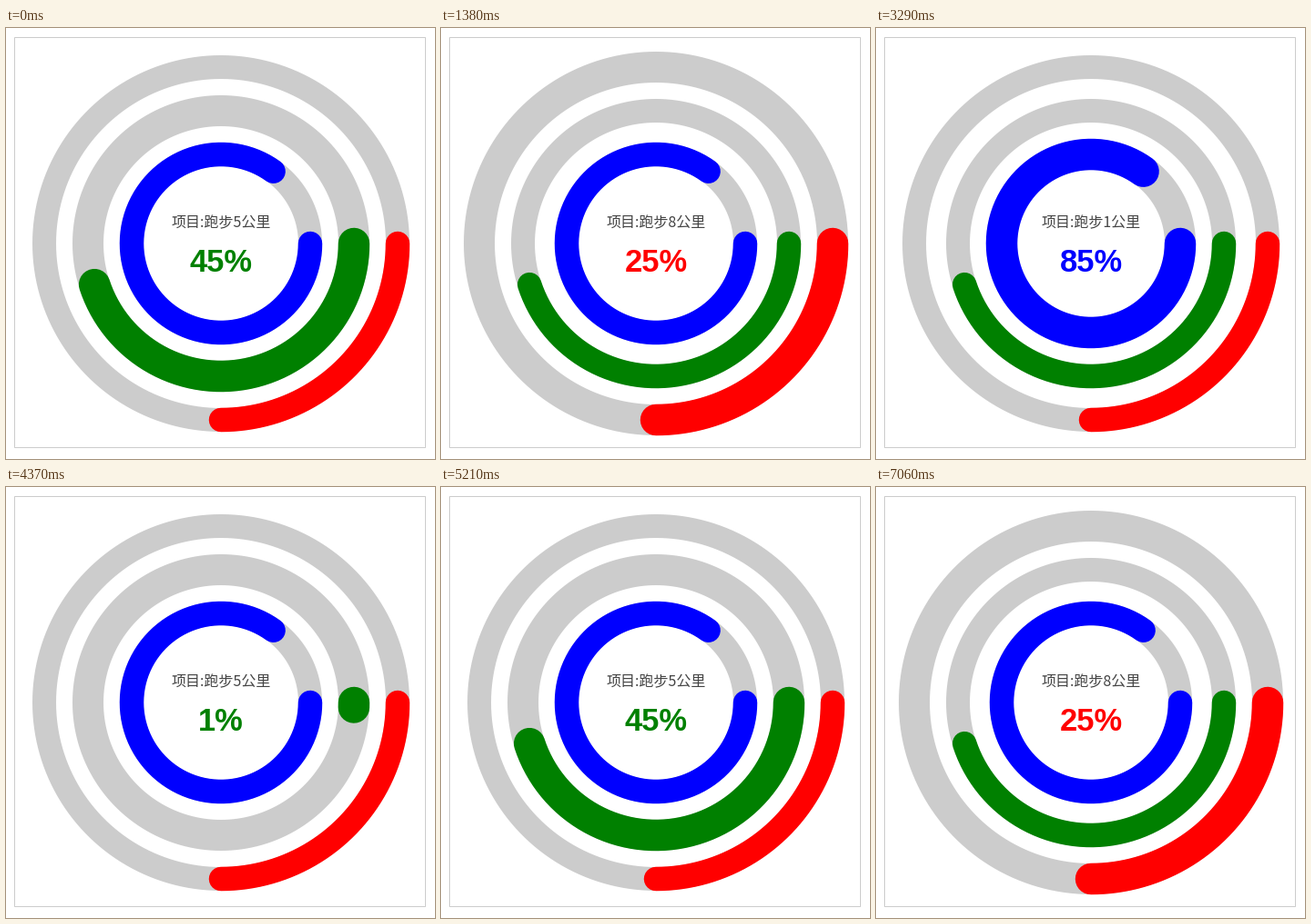
A matplotlib script that plays this animation: 471x474 px, repeating every 7520 ms.

```python
import numpy as np
import matplotlib.pyplot as plt
from matplotlib.animation import FuncAnimation
from matplotlib.patches import Rectangle

W, H, DPI = 471, 474, 64
CX, CY = 236, 237
LOOP, STEP = 7520, 20
GROW = 900
THIN, THICK = 26, 34
BLEED = 0.5  # bars have slightly heavier edges than their tracks

# radius, colour, percent, kilometres
RINGS = [
    (194, "#ff0000", 25, 8),
    (146, "#008000", 45, 5),
    (98, "#0000ff", 85, 1),
]
# start time in ms, ring index
TURNS = [(4367 - LOOP, 1), (580, 0), (2471, 2), (4367, 1), (6260, 0)]


def pt(px):
    return px * 72 / DPI


def arc(radius, percent):
    a = np.linspace(0, 2 * np.pi * percent / 100, 181)
    return CX + radius * np.cos(a), CY + radius * np.sin(a)


def ease_out(t):
    return 1 - (1 - min(max(t, 0), 1)) ** 4


fig = plt.figure(figsize=(W / DPI, H / DPI), dpi=DPI, facecolor="white")
ax = fig.add_axes([0, 0, 1, 1])
ax.set_xlim(0, W)
ax.set_ylim(H, 0)
ax.axis("off")

ax.add_patch(Rectangle((9.5, 10.5), 451, 451, fill=False, ec="#cccccc",
                       lw=pt(1), snap=False))

tracks, bars = [], []
for radius, color, percent, _ in RINGS:
    tracks += ax.plot(*arc(radius, 100), color="#cccccc", lw=pt(THIN),
                      solid_capstyle="butt")
    bars += ax.plot(*arc(radius, percent), color=color, lw=pt(THIN + BLEED),
                    solid_capstyle="round", zorder=3)

label = ax.text(CX, 219, "", ha="center", va="baseline", color="#444444",
                fontname="Noto Sans CJK JP", fontsize=pt(16))
value = ax.text(CX, 268, "", ha="center", va="baseline", weight="bold",
                fontname="Liberation Sans", fontsize=pt(34.5))


def draw(i):
    now = i * STEP + STEP / 2
    start, active = [turn for turn in TURNS if turn[0] <= now][-1]
    for k, (radius, color, percent, km) in enumerate(RINGS):
        width = THIN
        if k == active:
            width = THICK
            percent *= ease_out((now - start) / GROW)
            label.set_text(f"项目:跑步{km}公里")
            value.set_text(f"{round(percent)}%")
            value.set_color(color)
        tracks[k].set_linewidth(pt(width))
        bars[k].set_linewidth(pt(width + BLEED))
        bars[k].set_data(*arc(radius, percent))
    return [*tracks, *bars, label, value]


anim = FuncAnimation(fig, draw, frames=LOOP // STEP, interval=STEP,
                     repeat=True, repeat_delay=0, blit=False)
plt.show()
```
